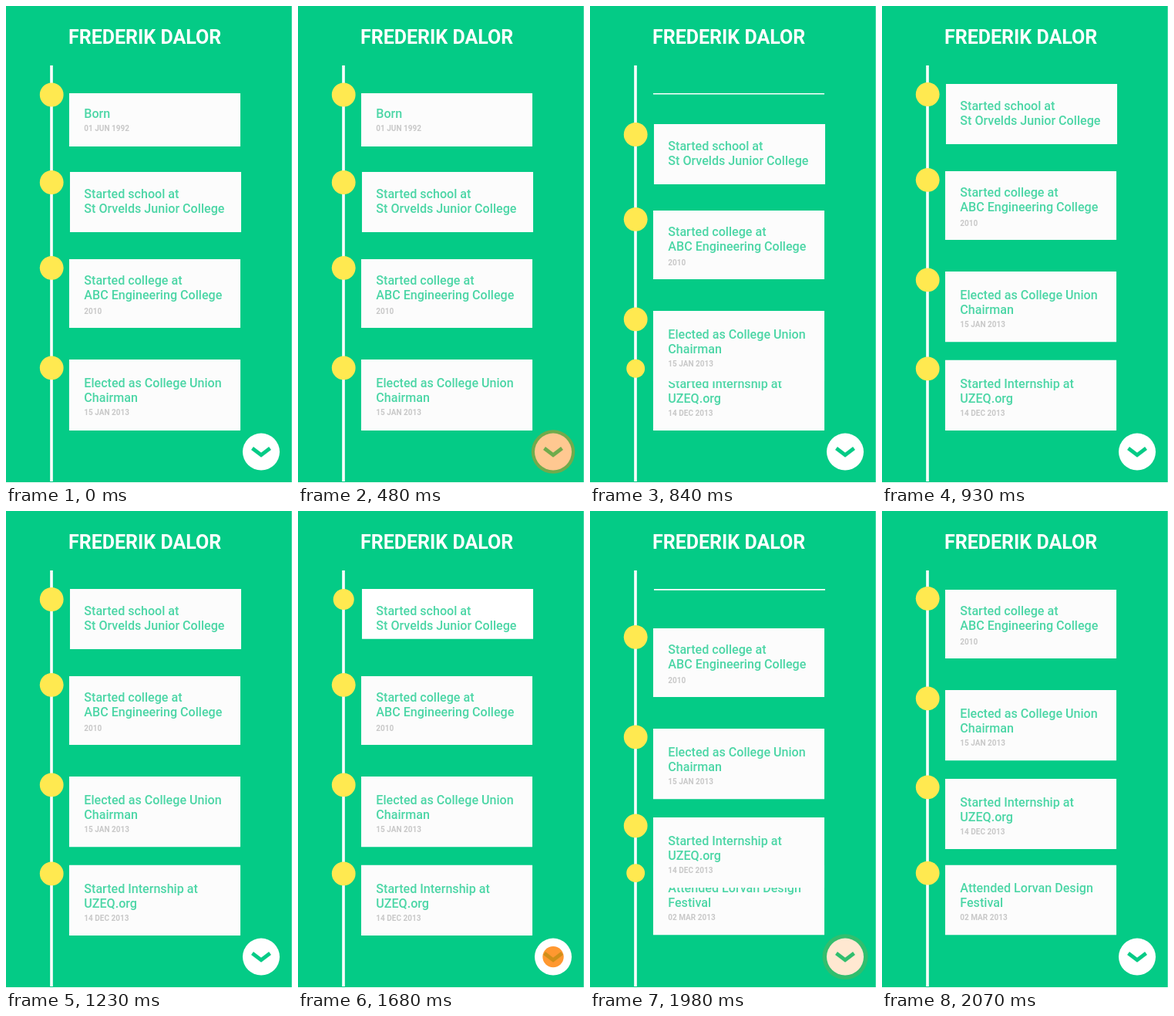
Animation of 371x618 px, one loop 2700 ms. Source, as an HTML page:

```html
<!DOCTYPE html>
<html lang="en">
<head>
<meta charset="utf-8">
<title>Life timeline</title>
<style>
  html, body { margin: 0; width: 100%; height: 100%; overflow: hidden; background: #fff; }
  svg { display: block; }
  text { font-family: Roboto, "Open Sans", sans-serif; }
  .name { font-size: 25px; font-weight: 700; fill: #fff; }
  .line { font-size: 16.1px; font-weight: 500; fill: #4cd6a6; }
  .date { font-size: 10px; font-weight: 700; fill: #c8c8c8; }
  .dot { fill: #ffe950; }
</style>
</head>
<body>
<svg id="stage" width="371" height="618" viewBox="0 0 371 618">
  <rect width="370.7" height="617" fill="#04cb86"/>
  <text class="name" x="81" y="49">FREDERIK DALOR</text>
  <rect x="57.2" y="77" width="3.6" height="539" fill="#fff"/>
  <g id="cards"></g>
  <g id="dots"></g>
  <circle cx="331" cy="577.6" r="24" fill="#fff"/>
  <path d="M319.5 573l11.5 8.7 11.5-8.7" fill="none" stroke="#04cb86" stroke-width="4.8"/>
  <circle id="ripple" cx="331" cy="577.6" r="0" fill="#ff8000"/>
</svg>
<script>
const LOOP = 2700, STEP = 30, SCROLL = 1140, DOT_R = 15.4, CARD_W = 222.4;
const TAPS = [235, 1615];
const EASE = { from: 582, power: 2 }, EARLY = { from: 510, power: 2.5 };

// y: card top at rest before, between and after the two scrolls
// gone / born: index of the scroll that removes / reveals the card
const CARDS = [
  { y: [113, 113, 113], h: 69, dot: 2, base: 32, lines: ["Born"], date: "01 JUN 1992", dateY: 49, gone: 0 },
  { y: [215, 101, 101], h: 78, dot: 13.5, base: 33.5, x: 82.8, lines: ["Started school at", "St Orvelds Junior College"], gone: 1, ease: EARLY },
  { y: [328, 214, 102], h: 89, dot: 11.3, base: 33, lines: ["Started college at", "ABC Engineering College"], date: "2010", dateY: 71 },
  { y: [458, 344, 232], h: 91.5, dot: 10.8, base: 35.5, lines: ["Elected as College Union", "Chairman"], date: "15 JAN 2013", dateY: 71.5 },
  { y: [459, 459, 347], h: 91, dot: 10.8, base: 35.5, lines: ["Started Internship at", "UZEQ.org"], date: "14 DEC 2013", dateY: 71.5, born: 0 },
  { y: [458.5, 458.5, 458.5], h: 91, dot: 10.6, base: 35.5, lines: ["Attended Lorvan Design", "Festival"], date: "02 MAR 2013", dateY: 71.5, born: 1 }
];

const $ = id => document.getElementById(id);
const clamp = v => Math.min(1, Math.max(0, v));
const span = (t, from, to) => clamp((t - from) / (to - from));

function add(parent, tag, attrs, text) {
  const el = document.createElementNS("http://www.w3.org/2000/svg", tag);
  set(el, attrs);
  if (text) el.textContent = text;
  return parent.appendChild(el);
}

function set(el, attrs) {
  for (const key in attrs) el.setAttribute(key, attrs[key]);
}

// Later cards lie beneath earlier ones
for (const card of [...CARDS].reverse()) {
  const x = card.x || 81.8;
  card.box = add($("cards"), "svg", { x, width: CARD_W, height: card.h, overflow: "hidden" });
  card.face = add(card.box, "rect", { width: CARD_W, height: card.h, fill: "#fcfcfc" });
  card.lines.forEach((text, i) =>
    add(card.box, "text", { class: "line", x: 101.3 - x, y: card.base + 19 * i }, text));
  if (card.date) add(card.box, "text", { class: "date", x: 101.3 - x, y: card.dateY }, card.date);
  card.spot = add($("dots"), "circle", { class: "dot", cx: 59.2 });
}

function drawCard(card, t) {
  const { from, power } = card.ease || EASE;
  const moves = [0, SCROLL].map(delay => span(t - delay, from, 930) ** power);
  const [a, b, c] = card.y;
  const y = a + Math.round((b - a) * moves[0] + (c - b) * moves[1]);
  let h = card.h, r = DOT_R, fill = "#fcfcfc";

  if (card.gone !== undefined) {
    const local = t - card.gone * SCROLL;
    const fold = span(local, 510, 930);
    h *= (1 - fold) ** 2.5;
    r *= 1 - span(local, 510, 755);
    if (fold > 0) fill = "#fff";
  }
  if (card.born !== undefined) r *= 0.5 + 0.5 * moves[card.born];

  const shown = card.born === 1 && moves[1] === 0 ? "none" : "inline";
  set(card.box, { y, height: h, display: h < 0.1 ? "none" : shown });
  set(card.face, { fill });
  set(card.spot, { cy: y + card.dot, r, display: shown });
}

function drawRipple(t) {
  const start = t < TAPS[1] ? TAPS[0] : TAPS[1];
  const left = 1 - span(t, start, start + 450);
  set($("ripple"), { r: 29.5 * (1 - left ** 4), opacity: 0.95 * left });
}

function draw(now) {
  const t = Math.floor((now % LOOP) / STEP) * STEP;
  CARDS.forEach(card => drawCard(card, t));
  drawRipple(t);
}

function tick() {
  draw(performance.now());
  requestAnimationFrame(tick);
}
tick();
</script>
</body>
</html>
```
